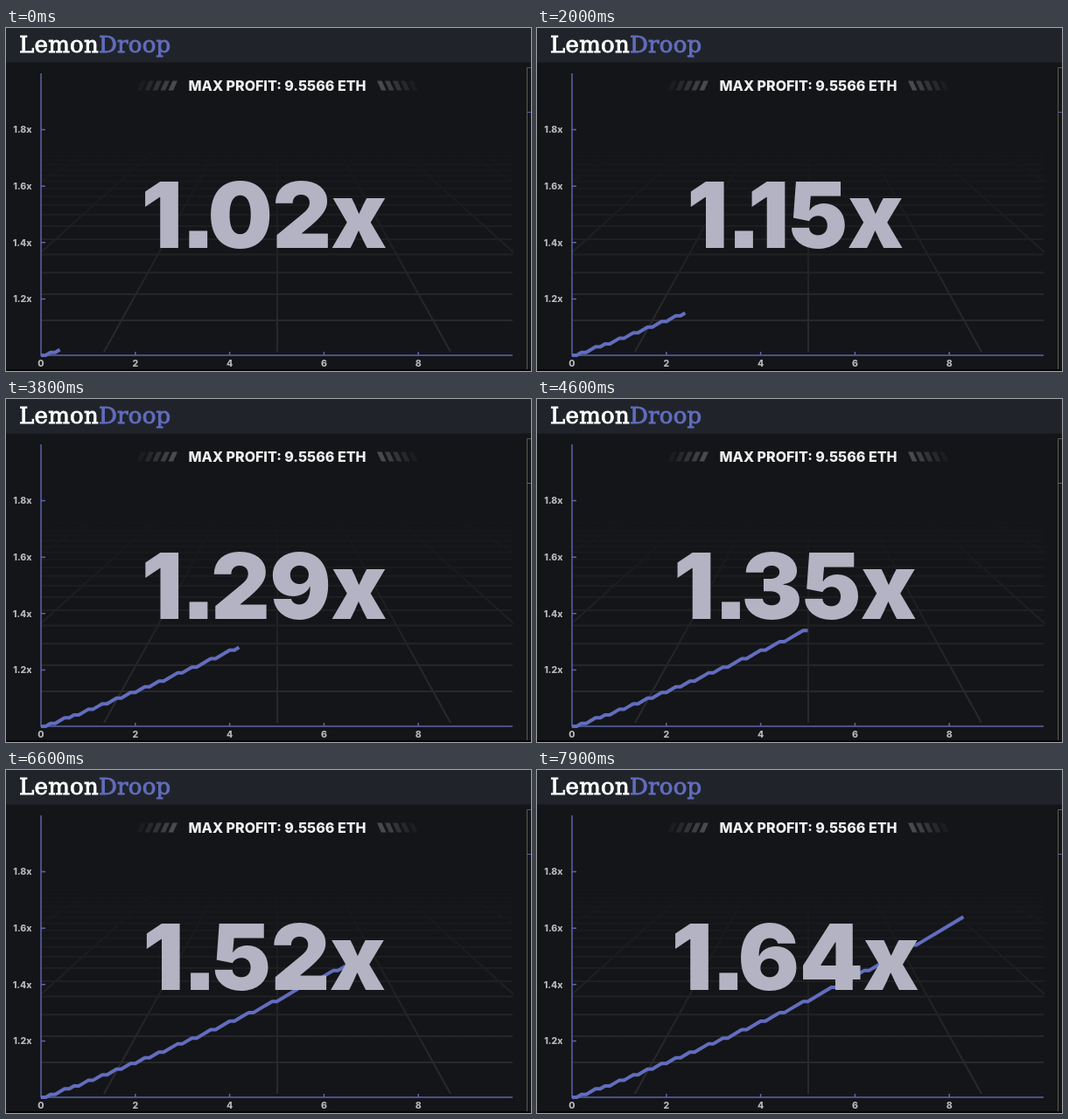
These frames come from a looping animation (600x393 px, 8000 ms). An HTML page:

```html
<!DOCTYPE html>
<html lang="en">
<head>
<meta charset="utf-8">
<title>Multiplier chart</title>
<style>
  html, body { margin: 0; width: 100%; height: 100%; overflow: hidden; background: #141518; }
  svg { display: block; width: 100vw; height: 100vh; }
  text { font-family: Inter, "Open Sans", sans-serif; }
  .logo { font: 26px "DejaVu Serif", serif; fill: #fff; stroke: #fff; stroke-width: .9; letter-spacing: .25px; }
  .logo .tail { fill: #626cbd; stroke: #626cbd; }
  .profit { font-size: 16px; font-weight: 850; fill: #f0f0f0; text-anchor: middle; }
  .labels { font-size: 10.5px; font-weight: 800; fill: #b9b9bc; }
  .axis { fill: none; stroke: #5a65aa; stroke-width: 1.5; }
  .grid { fill: none; stroke-width: 2; }
  .curve { fill: none; stroke: #626dbe; stroke-width: 4; stroke-linejoin: round; }
  .value { font-size: 104.5px; font-weight: 900; fill: #b3b3c3; text-anchor: middle; font-feature-settings: "ss07"; letter-spacing: -.4px; }
</style>
</head>
<body>
<svg viewBox="0 0 600 393" preserveAspectRatio="none">
  <defs>
    <linearGradient id="fade" gradientUnits="userSpaceOnUse" x1="0" y1="130" x2="0" y2="340">
      <stop offset="0" stop-color="#29292c" stop-opacity="0"/>
      <stop offset="1" stop-color="#29292c"/>
    </linearGradient>
  </defs>
  <rect width="600" height="393" fill="#141518"/>
  <rect width="600" height="39.5" fill="#20242a"/>
  <text class="logo" x="15" y="28">Lemon<tspan class="tail">Droop</tspan></text>

  <path id="grid" class="grid" stroke="url(#fade)"/>
  <g id="hatch" fill="#4a4a4d"></g>
  <text class="profit" x="310" y="72">MAX PROFIT: 9.5566 ETH</text>

  <path id="axis" class="axis"/>
  <g id="labels" class="labels"></g>
  <path id="curve" class="curve"/>
  <text id="value" class="value" x="294.7" y="252" dx="0 -1 -5"></text>

  <path d="M600 45.5H595.5V391" fill="none" stroke="#5f5b50"/>
  <path d="M596 96.5H600" stroke="#5862a6"/>
  <rect y="391" width="600" height="2" fill="#050506"/>
</svg>
<script>
  const LOOP = 8000, STEP = 100, START = 0.4, RATE = 0.06;
  const LEFT = 40, RIGHT = 579, TOP = 52, BASE = 375;
  const $ = id => document.getElementById(id);
  const px = sec => LEFT + sec * 53.9;
  const py = mult => BASE - (mult - 1) * 323;

  function add(parent, tag, attrs, text = "") {
    const el = document.createElementNS("http://www.w3.org/2000/svg", tag);
    for (const key in attrs) el.setAttribute(key, attrs[key]);
    el.textContent = text;
    parent.append(el);
  }

  // Floor in perspective: receding rows, and rays from a vanishing point.
  function drawGrid() {
    let d = "";
    for (let n = 0; n < 18; n++) {
      const y = 60 + 1 / (0.003636 + 0.00044 * n + 0.000006 * n * n);
      d += `M${LEFT} ${y}H${RIGHT}`;
    }
    const vx = 310, vy = 13;
    for (let k = -3; k <= 3; k++) {
      const slope = k * 198 / 358;
      const end = Math.min(371, k ? vy + 270 / Math.abs(slope) : 371);
      d += `M${vx + slope * (135 - vy)} 135L${vx + slope * (end - vy)} ${end}`;
    }
    $("grid").setAttribute("d", d);
  }

  function drawAxes() {
    let d = `M${LEFT} ${TOP}V${BASE}H${RIGHT}`;
    for (let i = 1; i <= 4; i++) {
      const mult = 1 + i * 0.2, y = py(mult);
      d += `M${LEFT} ${y}h5`;
      add($("labels"), "text", { x: 29.5, y: y + 3.7, "text-anchor": "end" }, mult.toFixed(1) + "x");
    }
    for (let sec = 0; sec <= 8; sec += 2) {
      d += `M${px(sec)} ${BASE}v-4`;
      add($("labels"), "text", { x: px(sec), y: 388.3, "text-anchor": "middle" }, sec);
    }
    $("axis").setAttribute("d", d);
  }

  function drawHatch() {
    for (let i = 0; i < 5; i++) {
      for (const side of [-1, 1]) {
        const x = 310 + side * (114 + i * 9), s = -side;
        add($("hatch"), "path", {
          d: `M${x} 60.5h${-5.5 * s}l${-5 * s} 11h${5.5 * s}z`,
          opacity: 1 - i * 0.21
        });
      }
    }
  }

  function render(now) {
    const ticks = Math.floor((now % LOOP) / STEP);
    const count = Math.round(START * 10) + ticks;
    const points = [];
    for (let i = 0; i <= count; i++) {
      const sec = i / 10;
      const mult = Math.floor(100 * Math.exp(RATE * sec)) / 100;
      points.push(px(sec) + " " + py(mult));
    }
    $("curve").setAttribute("d", "M" + points.join("L"));
    // The readout lags the curve by a hundredth of a second.
    $("value").textContent = Math.exp(RATE * (count / 10 - 0.01)).toFixed(2) + "x";
  }

  drawGrid();
  drawAxes();
  drawHatch();
  const began = performance.now();
  function loop() {
    render(performance.now() - began);
    requestAnimationFrame(loop);
  }
  loop();
</script>
</body>
</html>
```
